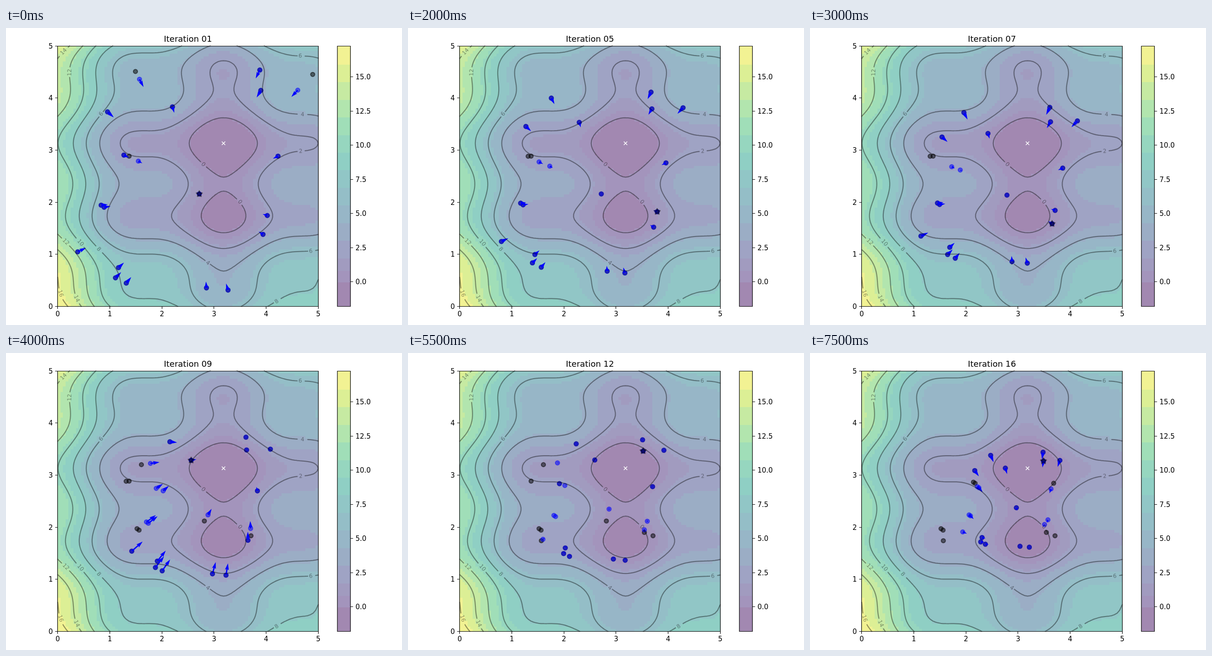
An HTML page with a canvas for the animation above (8000 ms loop, 864 px wide and 648 px high).

```html
<!DOCTYPE html>
<html lang="en">
<head>
<meta charset="utf-8">
<title>Particle swarm</title>
<style>
  html, body { margin: 0; width: 864px; height: 648px; overflow: hidden; background: #fff; }
  canvas { position: absolute; left: 112.8px; top: 39px; width: 568.5px; height: 568.5px; image-rendering: pixelated; }
  svg { position: absolute; left: 0; top: 0; font: 15px "DejaVu Sans", sans-serif; }
  .dot { stroke-width: 2.25; opacity: 1; }
  .best { fill: #000; stroke: #000; fill-opacity: .5; stroke-opacity: .5; }
  .now { fill: #00f; stroke: #00f; fill-opacity: .5; stroke-opacity: .5; }
  .arrow { fill: #00f; }
  .star { fill: #000; stroke: #000; stroke-width: 2.25; stroke-linejoin: bevel; fill-opacity: .4; stroke-opacity: .4; }
  .level { fill: none; stroke: #000; stroke-width: 2.25; stroke-linecap: round; stroke-opacity: .4; }
  .tag { font-size: 12px; fill-opacity: .4; text-anchor: middle; }
  .axis { fill: none; stroke: #000; stroke-width: 1.2; }
  .cross { fill: none; stroke: #fff; stroke-width: 1.5; }
</style>
</head>
<body>
<canvas id="field" width="100" height="100"></canvas>
<svg id="plot" width="864" height="648" viewBox="0 0 864 648"></svg>
<script>
const LEFT = 112.8, BOTTOM = 607.5, SIZE = 568.5, UNIT = SIZE / 5;
const FRAMES = 16, HOLD = 500, COUNT = 20;
const LOW = -1.808, HIGH = 17.27;
const N = 100;

const px = x => LEFT + x * UNIT;
const py = y => BOTTOM - y * UNIT;
const r2 = v => v.toFixed(2);
const cost = (x, y) =>
  (x - 3.14) ** 2 + (y - 2.72) ** 2 + Math.sin(3 * x + 1.41) + Math.sin(4 * y - 1.73);

// Colour bands
const VIRIDIS = ['440154', '482878', '3e4989', '31688e', '26828e',
  '1f9e89', '35b779', '6ece58', 'b5de2b', 'fde725']
  .map(h => [0, 2, 4].map(i => parseInt(h.slice(i, i + 2), 16)));
const BANDS = [LOW, -0.05, 0.8, 1.7];
for (let k = 0; k <= 10; k++) BANDS.push(3 + 1.29 * k);
BANDS.push(HIGH);

function shade(v) {
  const t = (v - LOW) / (HIGH - LOW) * 9;
  const i = Math.min(8, Math.floor(t));
  return VIRIDIS[i].map((c, k) => Math.round(127.5 + (c + (VIRIDIS[i + 1][k] - c) * (t - i)) / 2));
}
const COLORS = BANDS.slice(1).map((b, i) => shade((b + BANDS[i]) / 2));

function bandOf(v) {
  let i = 0;
  while (i < COLORS.length - 1 && v >= BANDS[i + 1]) i++;
  return i;
}

const at = i => i * 5 / (N - 1);
const grid = (i, j) => cost(at(i), at(j));

function paintField() {
  const ctx = document.getElementById('field').getContext('2d');
  for (let i = 0; i < N; i++) {
    for (let j = 0; j < N; j++) {
      ctx.fillStyle = `rgb(${COLORS[bandOf(grid(i, j))]})`;
      ctx.fillRect(i, N - 1 - j, 1, 1);
    }
  }
}

// Contour labels: level, x, y
const TAGS = [
  [14, 125, 51], [12, 138, 97], [6, 207, 187], [6, 642, 60], [4, 647, 188], [2, 643, 268],
  [0, 431, 297], [0, 511, 379], [4, 441, 512], [6, 665, 486], [8, 590, 596], [8, 203, 482],
  [10, 163, 468], [12, 131, 466], [16, 120, 579], [14, 155, 590]
];

function contour(level) {
  const gaps = TAGS.filter(t => t[0] === level);
  const reach = level > 9 ? 13 : 9;
  let d = '';
  for (let i = 0; i < N - 1; i++) {
    for (let j = 0; j < N - 1; j++) {
      const ring = [[i, j], [i + 1, j], [i + 1, j + 1], [i, j + 1]];
      const vals = ring.map(p => grid(...p) - level);
      const cuts = [];
      ring.forEach((p, k) => {
        const m = (k + 1) % 4, q = ring[m];
        if ((vals[k] < 0) === (vals[m] < 0)) return;
        const t = vals[k] / (vals[k] - vals[m]);
        cuts.push([px(at(p[0] + (q[0] - p[0]) * t)), py(at(p[1] + (q[1] - p[1]) * t))]);
      });
      for (let k = 0; k + 1 < cuts.length; k += 2) {
        const [a, b] = [cuts[k], cuts[k + 1]];
        const hidden = gaps.some(g =>
          Math.hypot((a[0] + b[0]) / 2 - g[1], (a[1] + b[1]) / 2 - g[2]) < reach);
        if (!hidden) d += `M${a.map(r2)}L${b.map(r2)}`;
      }
    }
  }
  return `<path class="level" d="${d}"/>`;
}

function tag([level, sx, sy]) {
  const x = (sx - LEFT) / UNIT, y = (BOTTOM - sy) / UNIT;
  const gx = 2 * (x - 3.14) + 3 * Math.cos(3 * x + 1.41);
  const gy = 2 * (y - 2.72) + 4 * Math.cos(4 * y - 1.73);
  let turn = Math.atan(gx / gy) * 180 / Math.PI;
  if (turn > 80) turn -= 180;
  return `<text class="tag" y="4.4" transform="translate(${sx} ${sy}) rotate(${r2(turn)})">${level}</text>`;
}

const text = (x, y, anchor, s) => `<text x="${x}" y="${y}" text-anchor="${anchor}">${s}</text>`;

function axes() {
  let out = '', ticks = '';
  for (let k = 0; k <= 5; k++) {
    const x = Math.floor(px(k)) + 0.5, y = Math.floor(py(k)) + 0.5;
    ticks += `M${x} 607.5v5.25M112.5 ${y}h-5.25`;
    out += text(r2(px(k)), 629.3, 'middle', k) + text(102.3, r2(py(k) + 5.5), 'end', k);
  }
  const level = v => BOTTOM - (v - LOW) / (HIGH - LOW) * SIZE;
  COLORS.forEach((c, i) => {
    const top = level(BANDS[i + 1]);
    out += `<rect x="723" y="${r2(top)}" width="29" height="${r2(level(BANDS[i]) - top)}" fill="rgb(${c})" shape-rendering="crispEdges"/>`;
  });
  for (let v = 0; v <= 15; v += 2.5) {
    const y = level(v);
    ticks += `M752 ${Math.floor(y) + 0.5}h5.25`;
    out += text(762.5, r2(y + 5.5), 'start', v.toFixed(1));
  }
  return out + `<path class="axis" d="${ticks}M112.5 39.5h569v568h-569zM723 39.5h28.5v568h-28.5z"/>`;
}

// Mersenne Twister, uniform doubles
function twister(seed) {
  const mt = [seed];
  for (let i = 1; i < 624; i++) {
    const p = mt[i - 1];
    mt[i] = (Math.imul(1812433253, p ^ (p >>> 30)) + i) >>> 0;
  }
  let at = 0;
  const word = () => {
    let y = (mt[at] & 0x80000000) | (mt[(at + 1) % 624] & 0x7fffffff);
    mt[at] = (mt[(at + 397) % 624] ^ (y >>> 1) ^ (y & 1 ? 0x9908b0df : 0)) >>> 0;
    y = mt[at];
    at = (at + 1) % 624;
    y ^= y >>> 11;
    y ^= (y << 7) & 0x9d2c5680;
    y ^= (y << 15) & 0xefc60000;
    return (y ^ (y >>> 18)) >>> 0;
  };
  return () => {
    const hi = word() >>> 5, lo = word() >>> 6;
    return (hi * 67108864 + lo) / 9007199254740992;
  };
}

// Swarm without inertia: pulled to own best and to the shared best
function simulate() {
  const rand = twister(100);
  const draw = () => Array.from({ length: COUNT }, () => rand() * 5);
  const xs = draw(), ys = draw();
  for (let k = 0; k < 46; k++) rand(); // unused starting speeds
  const swarm = xs.map((x, i) => ({ x, y: ys[i], bx: x, by: ys[i], best: cost(x, ys[i]) }));
  const leader = () => swarm.reduce((a, b) => b.best < a.best ? b : a);
  const step = () => {
    const own = 0.1 * rand(), shared = 0.1 * rand();
    const { bx: gx, by: gy } = leader();
    for (const p of swarm) {
      p.vx = own * (p.bx - p.x) + shared * (gx - p.x);
      p.vy = own * (p.by - p.y) + shared * (gy - p.y);
      p.x += p.vx;
      p.y += p.vy;
      const c = cost(p.x, p.y);
      if (c <= p.best) Object.assign(p, { best: c, bx: p.x, by: p.y });
    }
  };
  step();
  return Array.from({ length: FRAMES }, () => {
    step();
    return drawSwarm(swarm, leader());
  });
}

const dot = (kind, x, y) =>
  `<circle class="dot ${kind}" cx="${r2(px(x))}" cy="${r2(py(y))}" r="4.5"/>`;

function arrow(p) {
  const w = SIZE * 0.005;
  const len = Math.hypot(p.vx, p.vy) * UNIT / w;
  const place = `translate(${r2(px(p.x))} ${r2(py(p.y))})`;
  if (len < 1) return `<circle class="arrow" r="${r2(w / 2)}" transform="${place}"/>`;
  const full = Math.max(len, 5), scale = w * Math.min(1, len / 5);
  const neck = full - 4.5, barb = full - 5;
  const turn = Math.atan2(-p.vy, p.vx) * 180 / Math.PI;
  return `<path class="arrow" transform="${place} rotate(${r2(turn)}) scale(${scale.toFixed(4)})" ` +
    `d="M0-.5L${neck}-.5L${barb}-1.5L${full} 0L${barb} 1.5L${neck} .5L0 .5z"/>`;
}

function star(x, y) {
  const pts = Array.from({ length: 10 }, (_, k) => {
    const r = k % 2 ? 7.5 * 0.382 : 7.5, a = k * Math.PI / 5;
    return [r2(px(x) + r * Math.sin(a)), r2(py(y) - r * Math.cos(a))];
  });
  return `<polygon class="star" points="${pts.join(' ')}"/>`;
}

const drawSwarm = (swarm, lead) =>
  swarm.map(p => dot('best', p.bx, p.by)).join('') +
  swarm.map(p => dot('now', p.x, p.y)).join('') +
  swarm.map(arrow).join('') + star(lead.bx, lead.by);

paintField();
let lines = '';
for (let v = 0; v <= 16; v += 2) lines += contour(v);
const cx = r2(px(3.1818)), cy = r2(py(3.1313));
document.getElementById('plot').innerHTML =
  '<g id="swarm"></g>' + lines + TAGS.map(tag).join('') +
  `<path class="cross" transform="translate(${cx} ${cy})" d="M-3.75-3.75L3.75 3.75M-3.75 3.75L3.75-3.75"/>` +
  axes() + '<text id="title" x="397" y="30" font-size="18" text-anchor="middle"></text>';

const poses = simulate();
const swarmEl = document.getElementById('swarm');
const titleEl = document.getElementById('title');
const start = performance.now();
let shown = -1;

function show(k) {
  if (k === shown) return;
  shown = k;
  swarmEl.innerHTML = poses[k];
  titleEl.textContent = 'Iteration ' + String(k + 1).padStart(2, '0');
}
function tick() {
  show(Math.floor((performance.now() - start) / HOLD) % FRAMES);
  requestAnimationFrame(tick);
}
show(0);
requestAnimationFrame(tick);
</script>
</body>
</html>
```
